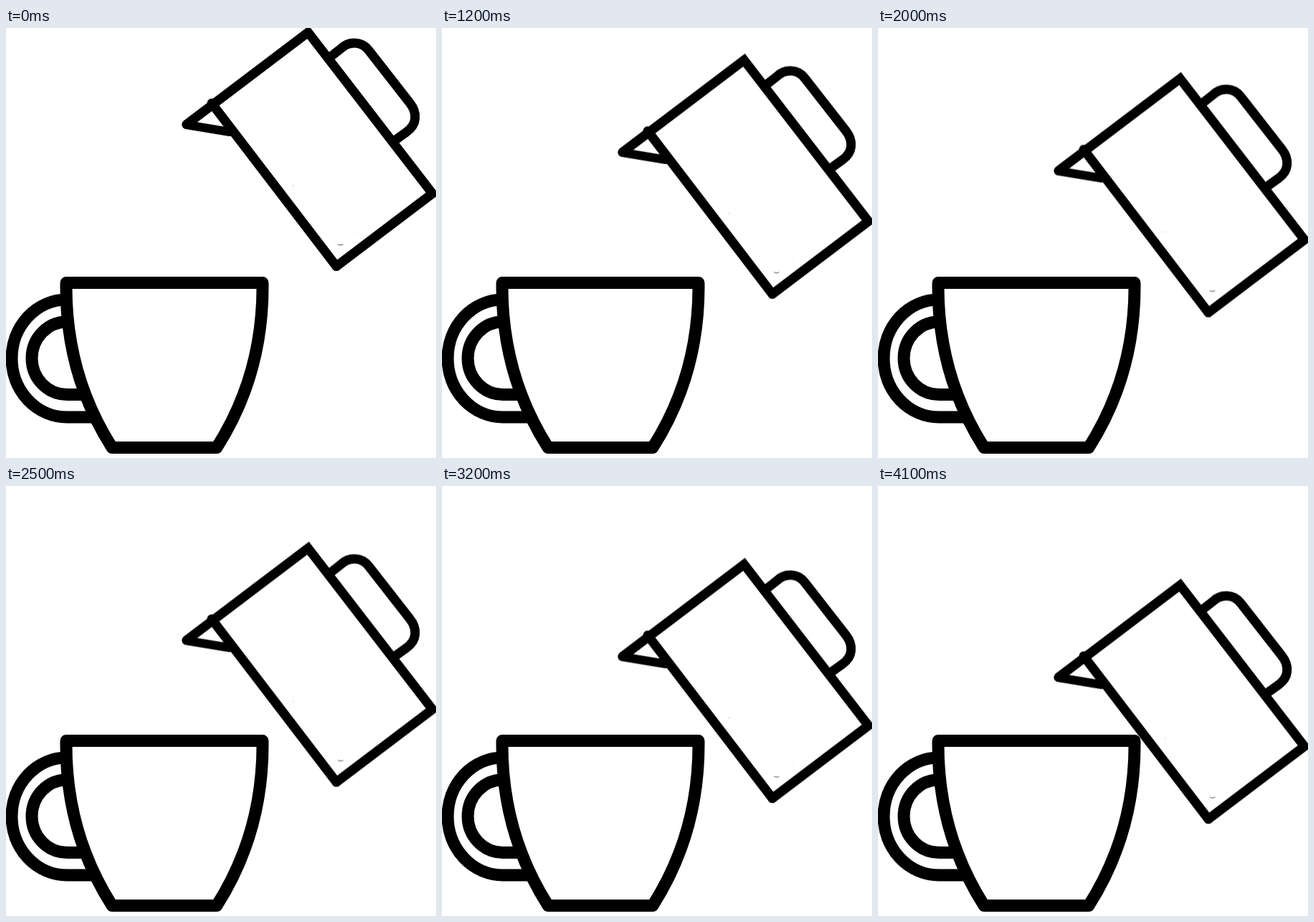
Recreate the animation shown at these times as an HTML page. Size 600 px wide and 600 px high, loop 5100 ms.

```html
<!DOCTYPE html>
<html lang="en">
<head>
<meta charset="utf-8">
<title>Jug and cup</title>
<style>
  html, body { margin: 0; width: 100%; height: 100%; overflow: hidden; background: #fff; }
  svg { display: block; width: 100%; height: 100%; }
  path { fill: none; stroke: #000; stroke-linecap: round; }
  .cup path { stroke-width: 17; stroke-linejoin: round; }
  .cup .handle { stroke-linecap: butt; }
  .jug path { stroke-width: 13; }
  .jug .spout { stroke-width: 12; }
  .jug .mark { stroke: #777; stroke-width: 1.4; }
  .jug .speck { stroke: #ddd; stroke-width: 1.6; }
</style>
</head>
<body>
<svg viewBox="0 0 600 600">
  <g class="cup">
    <path class="handle" d="M85 379A77 82 0 0 0 85 543H125"/>
    <path class="handle" d="M85 410A49 50.750 0 0 0 85 511.5H108"/>
    <path d="M84 355.5H358C359 440 337 518 294 585.5H148C105 518 83 440 84 355.5Z"/>
  </g>
  <g class="jug" id="jug">
    <path d="M453 40L467 29C478 18 496 18 506 31L563 104C575 119 573 135 559 145L543 156.5"/>
    <path d="M252 134.5L421.5 6L595 231L461 332.5"/>
    <path d="M287 105L461 332.5"/>
    <path class="spout" d="M251.5 135L312 145"/>
    <path class="mark" d="M463.5 302Q467 304 470 302"/>
    <path class="speck" d="M490.5 286.5h.1M400 220h1.5"/>
  </g>
</svg>
<script>
  const LOOP = 5100, TICK = 100, TICKS = 41, DROP = 132.3;
  const at = y => `translate(0px, ${y}px)`;

  document.getElementById('jug').animate([
    { offset: 0, transform: at(0), easing: `steps(${TICKS}, end)` },
    { offset: TICK * TICKS / LOOP, transform: at(DROP) },
    { offset: 1, transform: at(DROP) }
  ], { duration: LOOP, iterations: Infinity });
</script>
</body>
</html>
```
